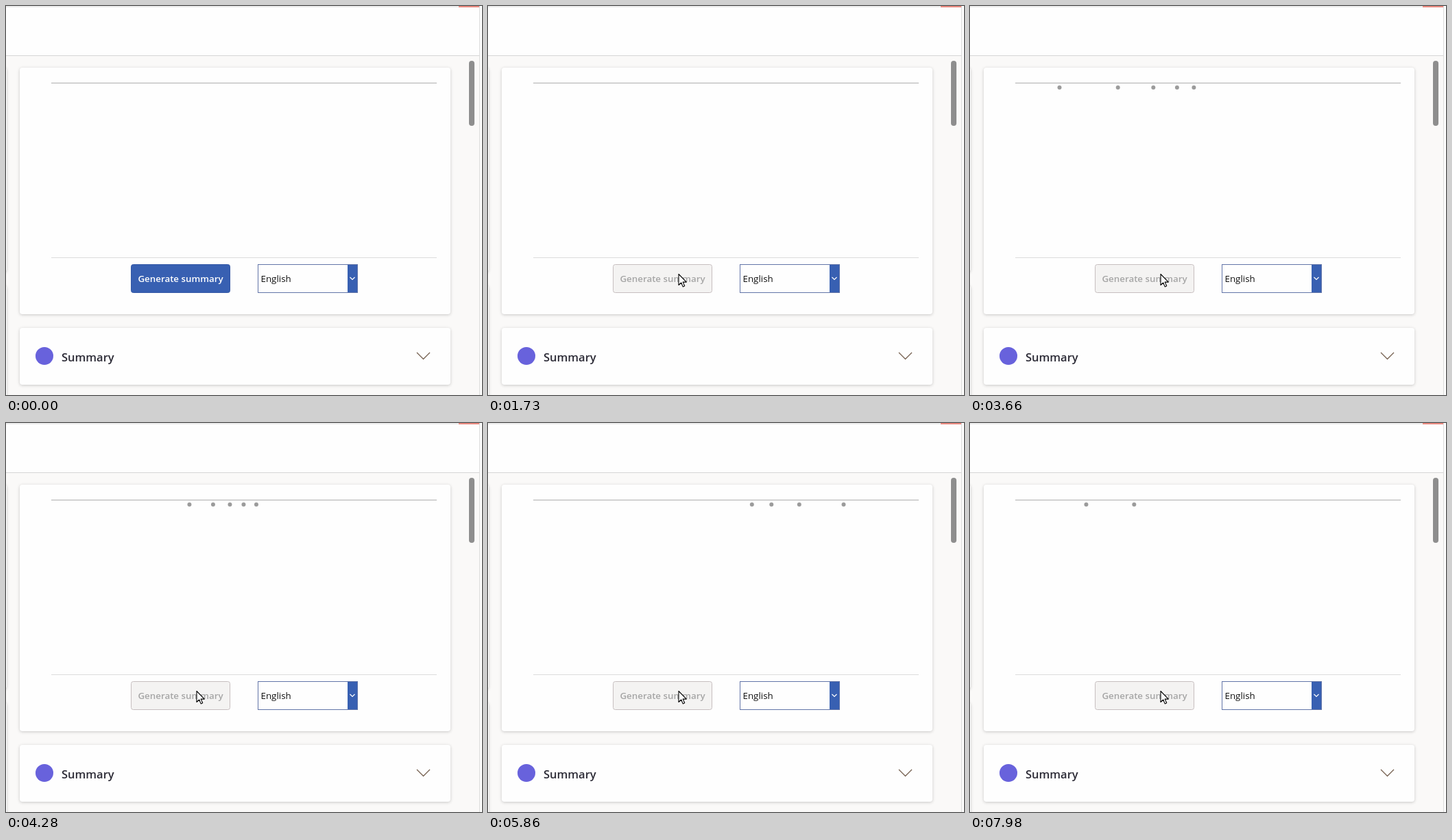
These frames come from a looping animation (694x568 px, 8000 ms). An HTML page:

```html
<!DOCTYPE html>
<html lang="en">
<head>
<meta charset="utf-8">
<title>Generate summary</title>
<style>
  html, body { margin: 0; width: 100%; height: 100%; overflow: hidden; background: #faf9f8; }
  svg { display: block; width: 694px; height: 568px; }
  text { font-family: "Open Sans", "Noto Sans", sans-serif; font-size: 13.33px; }
  .card { fill: #fefefe; filter: drop-shadow(0 1px 2px rgba(0, 0, 0, .2)); }
  .pointer { fill: #fff; stroke: #000; stroke-width: 1.1; stroke-linejoin: round; }
  #button rect { fill: #3860b2; stroke: #3458a6; }
  #button text { fill: #fff; font-weight: 600; }
  #button.hover rect { fill: #265fa8; stroke: #265fa8; }
  #button.pressed rect { fill: #1f5294; stroke: #1f5294; }
  #button.disabled rect { fill: #f4f3f2; stroke: #c6bebf; }
  #button.disabled text { fill: #a6a6a6; }
  #focus { fill: none; stroke: #222; }
</style>
</head>
<body>
<svg viewBox="0 0 694 568">
  <defs>
    <clipPath id="track"><rect x="66" y="114" width="562" height="10"/></clipPath>
  </defs>

  <rect width="694" height="568" fill="#faf9f8"/>
  <rect width="690" height="72" fill="#fefefe"/>
  <rect width="690" height="2" fill="#ececec"/>
  <rect x="660" width="30" height="2" fill="#ea8a80"/>
  <rect y="72" width="690" height="1" fill="#d6d5d5"/>
  <rect x="690" width="1" height="568" fill="#dcdcdc"/>
  <rect x="691" width="3" height="568" fill="#fcfcfc"/>
  <rect x="675" y="80" width="8" height="95" rx="4" fill="#8e8e8e"/>

  <rect class="card" x="-30" y="90" width="31" height="298" rx="4"/>
  <rect class="card" x="-30" y="408" width="31" height="180" rx="4"/>
  <rect class="card" x="20" y="90" width="628" height="360" rx="4"/>
  <rect class="card" x="20" y="470" width="628" height="83" rx="4"/>

  <rect x="66" y="112" width="562" height="1" fill="#aeaeae"/>
  <rect x="66" y="367" width="562" height="1" fill="#dcdcdc"/>
  <g id="dots" fill="#9b9b9b" clip-path="url(#track)"></g>

  <g id="button">
    <rect x="182.5" y="377.5" width="144" height="41" rx="3"/>
    <text x="254.5" y="403" text-anchor="middle">Generate summary</text>
  </g>
  <rect id="focus" x="181.5" y="376.5" width="146" height="43" rx="3"/>

  <rect x="367.5" y="377.5" width="145" height="41" fill="#fefefe" stroke="#6275a8"/>
  <rect x="498" y="378" width="14" height="40" fill="#3860b2"/>
  <path d="M501.5 396L505 399.5L508.5 396" fill="none" stroke="#fff" stroke-width="1.2"/>
  <text x="371.5" y="403" fill="#111">English</text>

  <circle cx="56" cy="511" r="13" fill="#6862dc"/>
  <text x="81" y="519" fill="#2b2a35" style="font-size:16.5px;font-weight:600">Summary</text>
  <path d="M599 506L608.5 515.5L618 506" fill="none" stroke="#75604f" stroke-width="1.3"/>

  <path id="arrow" class="pointer" d="M0 0V16L3.7 12.5L6.2 18.4L8.7 17.3L6.2 11.6H11.3Z"/>
  <path id="hand" class="pointer" d="M-1 2Q-1 0 1 0T3 2V8Q5 7 6 9Q8 8.5 8.5 10Q11 9.5 11 12V16Q11 18 9 20V22H0V20Q-3 17 -5.5 13Q-6.5 10.5 -4 10.5Q-2 11 -1 13Z"/>
</svg>
<script>
  const LOOP = 8000;
  const STAGGER = 310;                 // delay between neighbouring dots
  const RUNS = [                       // first and last update, frame spacing, zero of the path
    { from: 2280, to: 7020, step: 68.98, zero: 2421 },
    { from: 7420, to: LOOP, step: 70, zero: 7549 }
  ];
  // Dot position, one knot per stagger, first knot at -2
  const PATH = [-200, -5, 131, 216, 267.5, 302, 326.5, 346.5, 365, 387.5, 417, 459.5, 528, 645, 800];
  const MOVE = { from: 660, step: 68.57, count: 7, start: [559, 537], end: [278, 391] };

  const byId = id => document.getElementById(id);
  const [button, focusRing, arrow, hand] = ['button', 'focus', 'arrow', 'hand'].map(byId);
  const dots = Array.from({ length: 5 }, () => {
    const dot = document.createElementNS('http://www.w3.org/2000/svg', 'circle');
    dot.setAttribute('r', 3);
    dot.setAttribute('cy', 119);
    return byId('dots').appendChild(dot);
  });

  const show = (node, on) => node.setAttribute('visibility', on ? 'visible' : 'hidden');

  function pathAt(u) {
    const i = Math.floor(u), f = u - i;
    const [a, b, c, d] = PATH.slice(i + 1, i + 5);
    return b + f / 2 * (c - a + f * (2 * a - 5 * b + 4 * c - d + f * (3 * (b - c) + d - a)));
  }

  function drawDots(t) {
    const run = RUNS.find(r => t >= r.from && t < r.to);
    const held = run && run.from + Math.floor((t - run.from + 2) / run.step) * run.step;
    dots.forEach((dot, i) => {
      const u = run ? (held - run.zero) / STAGGER - i : -1;
      const visible = u >= -0.5 && u < 10.85;
      show(dot, visible);
      if (visible) dot.setAttribute('cx', pathAt(u).toFixed(2));
    });
  }

  function drawPointer(t) {
    const k = Math.min(MOVE.count, Math.floor((t - MOVE.from + 1) / MOVE.step));
    const eased = 1 - (1 - Math.max(0, k) / MOVE.count) ** 1.7;
    const [x, y] = MOVE.start.map((v, i) => Math.round(v + (MOVE.end[i] - v) * eased));
    const over = t >= MOVE.from && x < 327 && y < 419;
    const useHand = over && t < 1730;
    for (const node of [arrow, hand]) node.setAttribute('transform', `translate(${x} ${y + .5})`);
    show(hand, useHand);
    show(arrow, t >= MOVE.from && !useHand);
    return over;
  }

  function render(t) {
    drawDots(t);
    const over = drawPointer(t);
    const pressed = t >= 1620 && t < 1680;
    button.setAttribute('class', t >= 1680 ? 'disabled' : pressed ? 'pressed' : over ? 'hover' : '');
    show(focusRing, pressed);
  }

  const began = performance.now();
  function tick() {
    render((performance.now() - began) % LOOP);
    requestAnimationFrame(tick);
  }
  tick();
</script>
</body>
</html>
```
